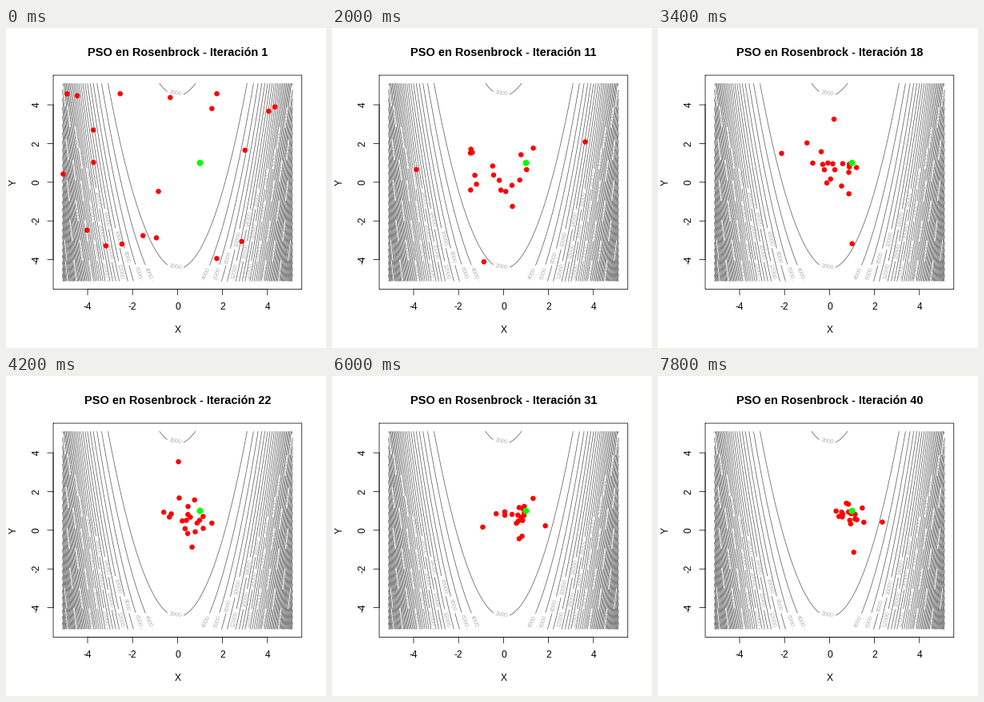
Recreate the animation shown at these times as a matplotlib script. Size 400 by 400 pixels, loop 8 s.

```python
import numpy as np
import matplotlib.pyplot as plt
from matplotlib.animation import FuncAnimation
from matplotlib.collections import LineCollection

PT = 0.72                      # points per pixel at 100 dpi
LIM = 5.12
LEFT, RIGHT, TOP, BOTTOM = 59.04, 369.76, 59.04, 326.56
STEPS, SWARM = 40, 20
LABEL_GAP = 9.5                # least distance between side-by-side labels

plt.rcParams["font.family"] = "Liberation Sans"
rng = np.random.default_rng(12)


def px(x):
    return LEFT + (x / (2.16 * LIM) + 0.5) * (RIGHT - LEFT)


def py(y):
    return BOTTOM - (y / (2.16 * LIM) + 0.5) * (BOTTOM - TOP)


fig = plt.figure(figsize=(4, 4), dpi=100, facecolor="white")
ax = fig.add_axes([0, 0, 1, 1])
ax.set(xlim=(0, 400), ylim=(400, 0))
ax.axis("off")


def text(x, y, s, size=12, rot=0, va="baseline", **kw):
    return ax.text(x, y, s, fontsize=size * PT, rotation=rot, ha="center",
                   va=va, rotation_mode="anchor", **kw)


def stroke(xs, ys):
    ax.plot(xs, ys, color="black", lw=0.75 * PT, snap=False,
            solid_capstyle="round", solid_joinstyle="round", zorder=4)


# ---- contour lines -------------------------------------------------------
lines, labels = [], []


def is_free(mid, along, half):
    """True if a label at mid, lying in direction along, hits no other."""
    across = np.array([-along[1], along[0]])
    return all(abs((mid - m) @ along) >= half + h
               or abs((mid - m) @ across) >= LABEL_GAP for m, h in labels)


def add_contour(x, y, level):
    """Add one curve, broken by its label at the lowest free place."""
    pts = np.c_[px(x), py(y)]
    run = np.r_[0, np.cumsum(np.hypot(*np.diff(pts, axis=0).T))]
    half = 2.1 * len(str(level)) + 2.5
    spots = np.arange(half, run[-1] - half, 1.2)
    # Low places first, leaning slightly to the left
    height = (np.interp(spots, run, pts[:, 1])
              - 0.2 * np.interp(spots, run, pts[:, 0]))
    for spot in spots[np.argsort(-height)]:
        a, b = np.searchsorted(run, [spot - half, spot + half])
        b = min(b, len(pts) - 1)
        mid, span = (pts[a] + pts[b]) / 2, pts[b] - pts[a]
        if is_free(mid, span / np.hypot(*span), half):
            labels.append((mid, half))
            lines.extend([pts[:a + 1], pts[b:]])
            text(*mid, str(level), 7.2,
                 np.degrees(np.arctan2(-span[1], span[0])),
                 va="center_baseline", color="#b4b4b4", zorder=3)
            return
    lines.append(pts)


grid = np.linspace(-LIM, LIM, 6001)
for level in range(2000, 98001, 2000):
    root = np.sqrt((level - (1 - grid) ** 2) / 100)
    for y in (grid ** 2 - root, grid ** 2 + root):
        inside = np.flatnonzero(np.abs(y) <= LIM)
        breaks = np.flatnonzero(np.diff(inside) > 1) + 1
        for part in np.split(inside, breaks):
            if len(part) > 1:
                add_contour(grid[part], y[part], level)

ax.add_collection(LineCollection(lines, colors="#5e5e5e",
                                 linewidths=0.75 * PT, zorder=2))

# ---- frame, axes, titles -------------------------------------------------
stroke([LEFT, RIGHT, RIGHT, LEFT, LEFT], [TOP, TOP, BOTTOM, BOTTOM, TOP])
stroke([px(-4), px(4)], [BOTTOM] * 2)
stroke([LEFT] * 2, [py(-4), py(4)])
for v in range(-4, 5, 2):
    stroke([px(v)] * 2, [BOTTOM, BOTTOM + 7.2])
    stroke([LEFT, LEFT - 7.2], [py(v)] * 2)
    text(px(v), 352, str(v))
    text(41.8, py(v), str(v), rot=90)
text(px(0), 380.8, "X")
text(13, py(0), "Y", rot=90)
title = text(px(0), 34.6, "", 14.5, weight="bold")

# ---- swarm ---------------------------------------------------------------
start = rng.uniform(-LIM, LIM, (SWARM, 2))
swing = rng.standard_t(5, (SWARM, 2))
speed = rng.uniform(0.45, 0.95, (SWARM, 2))


def swarm(t):
    """Damped swings of all particles around the drifting best place."""
    centre = np.array([0.85, 0.5 + 0.4 * t / STEPS])
    centre[0] *= t / STEPS
    spread = 0.35 + 1.8 * np.exp(-t / 14)
    pts = (centre + (start - centre) * np.exp(-t / 7) * np.cos(speed * t)
           + 1.2 * spread * swing * np.sin(speed * t))
    return np.clip(pts, -LIM, LIM)


# The last dot is the optimum at (1, 1).
dots = ax.scatter(*np.ones((2, SWARM + 1)), linewidths=0, zorder=5,
                  c=["red"] * SWARM + ["lime"],
                  s=[(6.5 * PT) ** 2] * SWARM + [(8 * PT) ** 2])


def draw(i):
    title.set_text(f"PSO en Rosenbrock - Iteración {i + 1}")
    x, y = np.vstack([swarm(i), [1, 1]]).T
    dots.set_offsets(np.c_[px(x), py(y)])
    return title, dots


anim = FuncAnimation(fig, draw, frames=STEPS, interval=200, repeat=True,
                     repeat_delay=0, blit=False)
plt.show()
```
